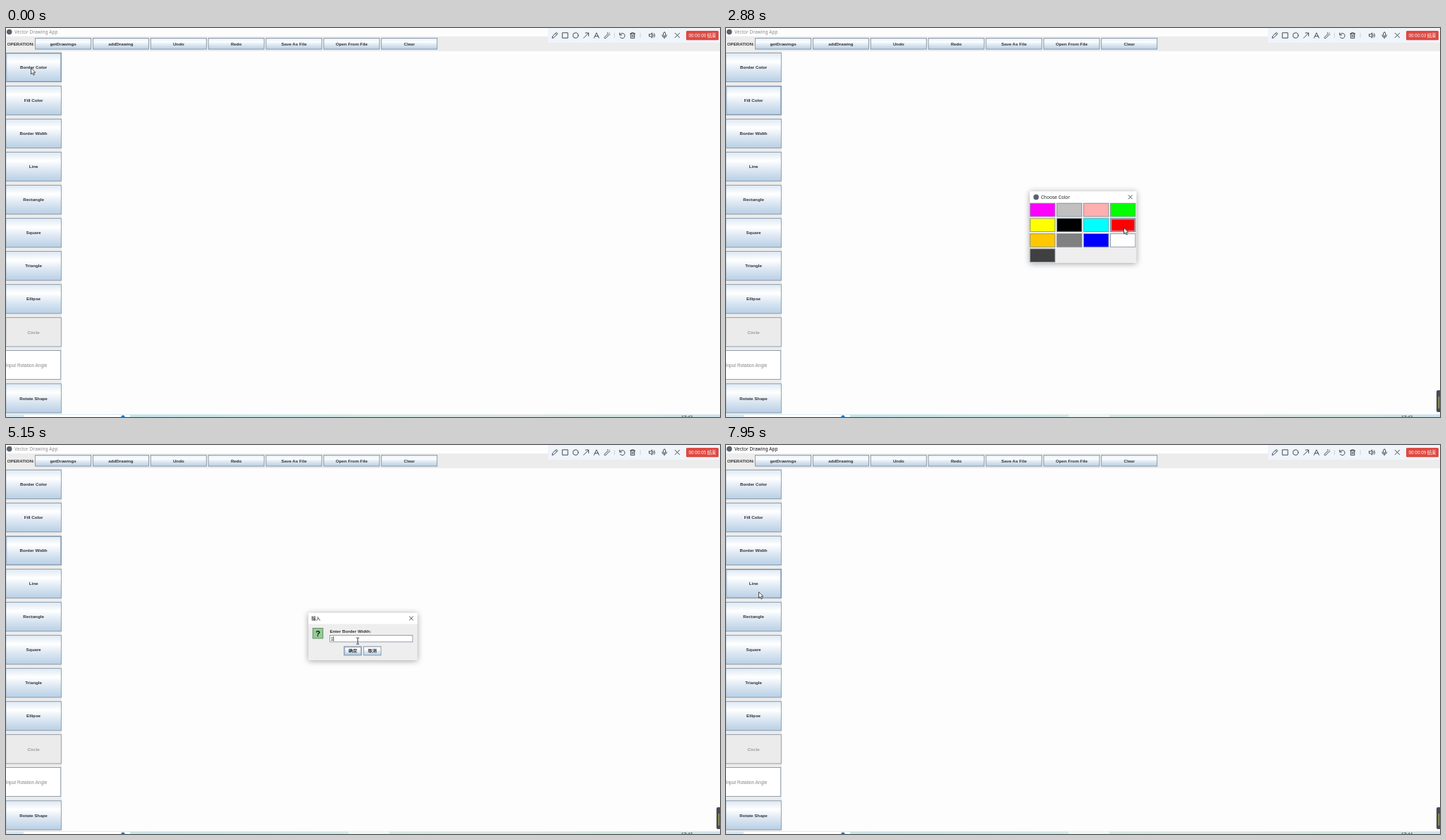
An HTML page that plays this animation: 1013 px wide and 553 px high, repeating every 7.99 s.

```html
<!DOCTYPE html>
<html lang="en">
<head>
<meta charset="utf-8">
<title>Vector Drawing App</title>
<style>
  html, body { margin: 0; width: 100%; height: 100%; overflow: hidden; background: #fdfdfd; }
  svg { display: block; width: 1013px; height: 553px; }
  text { font: 6.6px "Noto Sans", "Noto Sans CJK SC", sans-serif; white-space: pre; }
  .label { font: bold 6.2px "Liberation Sans", Arial, sans-serif; fill: #333; }
  .plain { font: 6.5px "Liberation Sans", Arial, sans-serif; fill: #333; }
  .cjk { font: 6.4px "Noto Sans CJK SC", sans-serif; }
  .mid { text-anchor: middle; }
  .face { stroke: #7a8a99; stroke-width: .8; }
  .glow { fill: none; stroke: #a3b8cc; stroke-width: 1.1; visibility: hidden; }
  .hot .face { stroke: #5d7690; }
  .hot .glow { visibility: inherit; }
  .down .face { fill: #b8cfe5; }
  #ok.down .face { fill: #a6c1dd; }
  .icon { fill: none; stroke: #3c4046; stroke-width: .95; stroke-linecap: round; stroke-linejoin: round; }
  .dialog { transform-box: fill-box; transform-origin: center; }
  .frame { filter: drop-shadow(0 1.5px 4px rgba(0, 0, 0, .36)); }
</style>
</head>
<body>
<svg id="stage" viewBox="0 0 1013 553" xmlns="http://www.w3.org/2000/svg">
  <defs>
    <linearGradient id="ocean" x2="0" y2="1">
      <stop stop-color="#dde8f3"/><stop offset=".3" stop-color="#fff"/>
      <stop offset=".6" stop-color="#dde8f3"/><stop offset="1" stop-color="#b8cfe5"/>
    </linearGradient>
    <linearGradient id="task">
      <stop stop-color="#d5e8f2"/><stop offset=".2" stop-color="#c5e4ea"/>
      <stop offset=".5" stop-color="#d2eae6"/><stop offset=".72" stop-color="#dfe6df"/>
      <stop offset=".85" stop-color="#cfe7df"/><stop offset="1" stop-color="#cde3ee"/>
    </linearGradient>
  </defs>

  <rect width="1013" height="553" fill="#fdfdfd"/>
  <rect y="12" width="1013" height="21" fill="#ececec"/>
  <rect y="33" width="79" height="516" fill="#ececec"/>
  <circle cx="4.7" cy="5.6" r="3.8" fill="#59616d"/>
  <text id="title" x="12" y="8.2">Vector Drawing App</text>
  <text class="label" x="1.8" y="24.8">OPERATION:</text>
  <g id="buttons"></g>
  <rect x="-.5" y="458.5" width="78.2" height="41" fill="#fff" class="face"/>
  <text class="plain" x="-.3" y="481.6" style="fill:#858585">Input Rotation Angle</text>

  <rect x="769" width="244" height="21" fill="#f0f4fb"/>
  <g class="icon">
    <path d="M775 14l.6-2.5 5.2-5.2 1.9 1.9-5.2 5.2zM779.5 7.6l1.9 1.9"/>
    <rect x="789.7" y="6.8" width="7.4" height="7.4"/>
    <circle cx="808.1" cy="10.6" r="3.8"/>
    <path d="M819.5 14.2l7-7M822.2 7h4.4v4.4"/>
    <path d="M834.3 14.2l3.5-7.4 3.5 7.4M835.7 11.7h4.2"/>
    <path d="M849 13.3l4.4-4.4 1.5 1.5-4.4 4.4zM853.4 7.5v-.8M856 9.2h.8M855.2 7.6l.7-.7"/>
    <path d="M870.7 7v3h3M871 9.7a3.6 3.6 0 1 1 .3 3.3"/>
    <path d="M885.4 8h7.2M887.5 8V6.8h3V8M886.3 8v6.4h5.4V8M888.2 10v2.5M889.9 10v2.5"/>
    <path d="M912.5 9v3h1.8l2.2 2V7l-2.2 2zM918 9a2 2 0 0 1 0 3M919.2 7.5a4 4 0 0 1 0 6"/>
    <rect x="932.6" y="6" width="3" height="5.6" rx="1.5"/>
    <path d="M930.8 10a3.3 3.3 0 0 0 6.6 0M934.1 13.3v1.5"/>
    <path d="M949.2 7.2l6.4 6.4M955.6 7.2l-6.4 6.4"/>
    <path d="M863.3 7.5v6M900 7.5v6" stroke="#c9ced6"/>
  </g>
  <rect x="965" y="4" width="46" height="13.2" rx="1.5" fill="#dd4a42"/>
  <text id="timer" class="cjk mid" x="988" y="13" fill="#fff"></text>

  <rect y="549.3" width="1013" height="3.7" fill="url(#task)"/>
  <rect x="25" y="550" width="151" height="3" fill="#fff"/>
  <circle cx="166" cy="553.2" r="2.7" fill="#1c7cd5"/>
  <rect id="task-item" x="486" y="549.3" width="58" height="3.7" fill="#f0f6f7"/>
  <text id="clock" x="958" y="556.3" style="font-size:6.3px" fill="#222"></text>
  <g id="side">
    <rect x="1008" y="515" width="8" height="31" rx="2" fill="#454b58"/>
    <path d="M1011.3 524v17" stroke="#b5b25a" stroke-width="1.2"/>
  </g>

  <g id="picker" class="dialog">
    <rect class="frame" x="431" y="232.3" width="151.3" height="101.7" fill="#eee"/>
    <rect x="431" y="232.3" width="151.3" height="16" fill="#fff"/>
    <circle cx="440" cy="240.4" r="3.8" fill="#59616d"/>
    <text id="picker-title" x="446.7" y="242.8">Choose Color</text>
    <path class="icon" d="M571 237.7l5.2 5.2M576.2 237.7l-5.2 5.2"/>
    <g id="cells"></g>
  </g>

  <g id="input" class="dialog">
    <rect class="frame" x="429" y="238.7" width="154.6" height="67.3" fill="#eee"/>
    <rect x="429" y="238.7" width="154.6" height="15.8" fill="#fff"/>
    <text class="cjk" x="433.3" y="249">输入</text>
    <path class="icon" d="M572.4 243.8l5.2 5.2M577.6 243.8l-5.2 5.2"/>
    <rect x="435.3" y="260.5" width="14.4" height="14.4" fill="#94cc94" stroke="#5c855c" stroke-width=".9"/>
    <text class="label mid" x="442.5" y="271.6" style="font-size:11px;fill:#111">?</text>
    <text class="label" x="459.4" y="267.2">Enter Border Width:</text>
    <rect class="face" x="459.5" y="270.5" width="117.4" height="9.4" fill="#fff"/>
    <text id="value" class="plain" x="460.7" y="277.9"></text>
    <path id="caret" stroke="#222" stroke-width=".8"/>
    <g id="actions"></g>
  </g>

  <g id="pointer">
    <path id="arrow" d="M0 0v8.6l2-1.8 1.5 3.2 1.5-.7-1.4-3.1h2.7z" fill="#fff" stroke="#222" stroke-width=".8" stroke-linejoin="round"/>
    <path id="beam" d="M-2-4.5q1.6 0 2 .8.4-.8 2-.8M0-3.7v7.6M-2 4.7q1.6 0 2-.8.4.8 2 .8" fill="none" stroke="#222" stroke-width=".9"/>
  </g>
</svg>

<script>
const LOOP = 7990;
const $ = id => document.getElementById(id);
const clamp = v => Math.min(1, Math.max(0, v));
const within = (t, a, b) => t >= a && t < b;
const show = (id, on) => $(id).style.visibility = on ? "visible" : "hidden";
const targets = { buttons: [], cells: [], actions: [] };

function addButton(layer, x, y, w, h, label = "", fill = "url(#ocean)", id = "") {
  const g = document.createElementNS("http://www.w3.org/2000/svg", "g");
  const idle = fill === "#ebebeb";
  g.id = id;
  g.innerHTML = `<rect class="face" x="${x}" y="${y}" width="${w}" height="${h}" fill="${fill}"/>
    <rect class="glow" x="${x + .9}" y="${y + .9}" width="${w - 1.8}" height="${h - 1.8}"/>
    <text class="label mid" x="${x + w / 2}" y="${y + h / 2 + 2.2}"${idle ? ' style="fill:#999"' : ""}>${label}</text>`;
  $(layer).append(g);
  if (!idle) targets[layer].push({ g, x, y, w, h });
  return g;
}

["getDrawings", "addDrawing", "Undo", "Redo", "Save As File", "Open From File", "Clear"]
  .forEach((s, i) => addButton("buttons", 41.6 + i * 81.85, 14.5, 79, 15.6, s));

const side = ["Border Color", "Fill Color", "Border Width", "Line", "Rectangle", "Square",
  "Triangle", "Ellipse", "Circle", "", "Rotate Shape"]
  .map((s, i) => s && addButton("buttons", -.2, 35.4 + i * 47.04, 78.5, 41.2, s, s === "Circle" ? "#ebebeb" : undefined));

const cells = ["#f0f", "#c0c0c0", "#ffafaf", "#0f0", "#ff0", "#000", "#0ff", "#f00",
  "#ffc800", "#808080", "#00f", "#fff", "#404040"]
  .map((c, i) => addButton("cells", 431.6 + i % 4 * 38, 249.2 + (i >> 2) * 21.6, 35.2, 18.8, "", c));

const ok = addButton("actions", 479.8, 286.3, 24.4, 12.6, "确定", undefined, "ok");
addButton("actions", 507.6, 286.3, 24.4, 12.6, "取消");

// Pointer stops: ms, x, y
const path = [
  [0, 35.5, 57], [380, 35.5, 57], [1200, 555.5, 260], [1450, 555.5, 260],
  [2050, 42, 104], [2380, 42, 104], [2820, 564.5, 284], [3080, 564.5, 284],
  [3600, 56.5, 166], [3640, 56.5, 166], [3880, 50, 155], [4200, 50, 155],
  [4840, 499, 278.5], [5540, 499, 278.5], [6100, 494, 291], [6560, 494, 291],
  [7700, 46.5, 209], [LOOP, 46.5, 209]
];

// Modal sessions: focus lost, opens, closes, opener
const modals = [
  { box: "picker", from: 0, open: 60, close: 1324, opener: side[0] },
  { box: "picker", from: 2160, open: 2220, close: 2940, opener: side[1] },
  { box: "input", from: 4040, open: 4090, close: 6400, opener: side[2] }
];
const seconds = [0, 400, 1300, 2300, 3300, 4400, 5380, 6240, 7050, 7800];

function pointerAt(t) {
  const i = path.findIndex((p, k) => k && t <= p[0]);
  const [a, ax, ay] = path[i - 1], [b, bx, by] = path[i];
  const p = clamp((t - a) / (b - a)), e = p * p * (3 - 2 * p);
  return [ax + (bx - ax) * e, ay + (by - ay) * e];
}

function pose(box, t) {
  const m = modals.find(m => m.box === box && within(t, m.open, m.close + 100));
  show(box, m);
  if (!m) return;
  const rise = clamp((t - m.open) / 180), grow = 1 - (1 - rise) ** 2;
  const fall = clamp((t - m.close) / 100);
  $(box).style.opacity = grow * (1 - fall);
  $(box).style.transform = `scale(${.9 + .1 * grow - .059 * fall})`;
}

function heat(layer, x, y, pinned) {
  for (const b of targets[layer]) {
    const inside = x >= b.x && x <= b.x + b.w && y >= b.y && y <= b.y + b.h;
    b.g.classList.toggle("hot", pinned ? b.g === pinned : inside);
  }
}

function render(t) {
  const [x, y] = pointerAt(t);
  const modal = modals.find(m => within(t, m.from, m.close));
  const typing = within(t, 4250, 6400) && x > 459 && x < 577 && y > 270 && y < 280;

  $("pointer").setAttribute("transform", `translate(${x} ${y})`);
  show("arrow", !typing);
  show("beam", typing);

  pose("picker", t);
  pose("input", t);
  heat("buttons", x, y, modal && modal.opener);
  heat("cells", x, y);
  heat("actions", x, y, x > 479 && y > 286 ? null : ok);
  cells[3].classList.toggle("down", within(t, 1250, 1450));
  cells[7].classList.toggle("down", within(t, 2900, 3050));
  ok.classList.toggle("down", within(t, 6280, 6500));

  $("title").style.fill = modal ? "#8f8f8f" : "#111";
  $("picker-title").style.fill = modal ? "#222" : "#aaa";
  const value = t < 5000 ? "" : t < 5380 ? "1" : "10";
  $("value").textContent = value;
  $("caret").setAttribute("d", `M${461 + value.length * 3.7} 271.8v7`);
  show("caret", within(t, 4250, 6280) && $("input").style.visibility === "visible");

  $("timer").textContent = `00:00:0${seconds.filter(s => s <= t).length - 1} 结束`;
  $("clock").textContent = t < 7050 ? "17:43" : "17:44";
  show("side", t >= 300);
  show("task-item", t >= 200);
}

const start = performance.now();
function tick() {
  render((performance.now() - start) % LOOP);
  requestAnimationFrame(tick);
}
tick();
</script>
</body>
</html>
```
